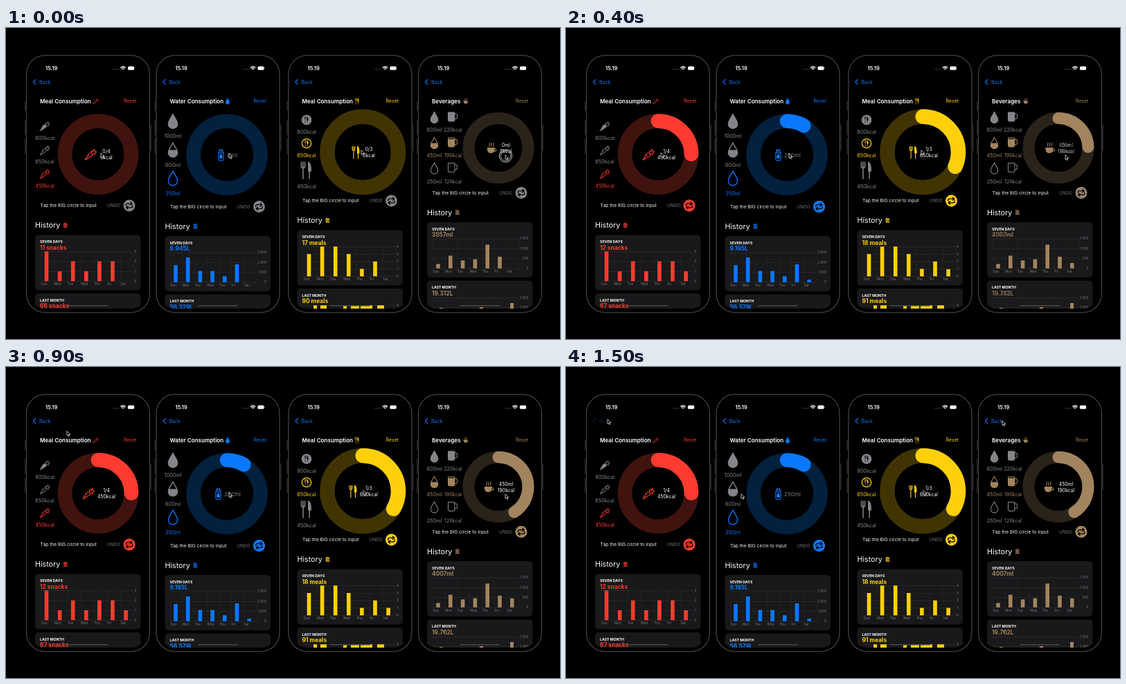
Write an HTML page with a canvas that moves like this. It is 800 by 450 pixels and loops after 1.6 s.

```html
<!DOCTYPE html>
<html lang="en">
<head>
<meta charset="utf-8">
<title>Consumption trackers</title>
<style>
  html, body { margin: 0; width: 100%; height: 100%; overflow: hidden; background: #000; }
  canvas { display: block; }
</style>
</head>
<body>
<canvas id="stage" width="800" height="450"></canvas>
<script>
const ctx = document.getElementById('stage').getContext('2d');
const LOOP = 1600, STEP = 100;
const GREY = '#858589', BLUE = '#0a74f5';
const DAYS = ['Sun', 'Mon', 'Tue', 'Wed', 'Thu', 'Fri', 'Sat'];

// Icons live in a box of about 22 units: a fillable body and stroked details.
const shape = (body, detail = '') => ({ body: new Path2D(body), detail: new Path2D(detail) });
const ICONS = {
  carrot: shape('M-10 10L-3.5-1.5C-1-5.5 5.5-1 2.5 2.5Z', 'M2.5-2.5L2-7 5-6 7-10 8-6 11-5 8-3 8 0 4-1M-4.5 1L-2.5 2.5M-6 6L-4.5 7'),
  drop: shape('M0-11C2-6 7-1 7 4A7 7 0 0 1-7 4C-7-1-2-6 0-11Z'),
  cutlery: shape('M2.6-11C5-9.5 6-4 5.6 1H2.6Z', 'M-7-11V-5.5Q-7-3-4.6-3Q-2.2-3-2.2-5.5V-11M-4.6-11V11M3.8 1V11'),
  cup: shape('M-8-1H6C6 6 4 9-1 9S-8 6-8-1Z', 'M6 1C11 0 11 6 5 6M-4-4C-6-7-2-8-4-11M0-4C-2-7 2-8 0-11M4-4C2-7 6-8 4-11'),
  mug: shape('M-9-9H4V6Q4 9 1 9H-6Q-9 9-9 6Z', 'M4-6H6Q9-6 9-3V1Q9 4 6 4H4'),
  bottle: shape('M0-2C1 0 2.6 2 2.6 4A2.6 2.6 0 0 1-2.6 4C-2.6 2-1 0 0-2Z', 'M-3-10.5H3V-8H-3ZM-3-8C-3-6-5-6-5-3V8Q-5 10.5-3 10.5H3Q5 10.5 5 8V-3C5-6 3-6 3-8M-5-4H5')
};

const PHONES = [
  { x: 29, title: 'Meal Consumption', small: 'carrot', smallX: 129.5, color: '#ff3b30', track: '#41130f',
    ring: [133, 182.6, 48, 20.8], turn: 90, start: 0, span: 300, row: 257,
    icon: 'carrot', iconX: 122, iconSize: .78, shift: -3, textX: 145, before: ['0/4', '0kcal'], after: ['1/4', '450kcal'],
    sideX: 27, side: [['carrot', 142, '800kcal', 159], ['carrot', 177, '650kcal', 193], ['carrot', 211, '450kcal', 228]],
    levels: [1, 0, 0], sideSize: .66, picked: 2,
    week: ['11 snacks', '12 snacks'], month: ['66 snacks', '67 snacks'],
    barX: 29.5, gap: 19.1, bars: [3, 1, 2, 1, 2, 2, 1], axis: ['3', '2', '1', '0'], max: 3,
    cursor: [[500, 137, 181], [700, 120, 145], [900, 88, 93], [1200, 61, 72], [1500, 60, 76]] },
  { x: 216.5, title: 'Water Consumption', small: 'drop', smallX: 320, color: '#0a78ff', track: '#02213f',
    ring: [319.1, 183.2, 48.4, 20.6], turn: 30, start: 75, span: 305, row: 258.5,
    icon: 'bottle', iconX: 310.5, iconSize: .74, shift: -4, textX: 327, before: ['0ml'], after: ['250ml'],
    sideX: 24.5, side: [['drop', 135, '1000ml', 156], ['drop', 176.5, '600ml', 198], ['drop', 217.5, '250ml', 239]],
    levels: [1, .5, 0], sideSize: .95, picked: 2,
    week: ['8.945L', '9.195L'], month: ['56.329L', '56.579L'],
    barX: 28.5, gap: 17.7, bars: [1.72, 2.5, 1.13, 1.13, .6, 1.8, .25], axis: ['3.000', '2.000', '1.000', '0'], max: 3,
    cursor: [[1200, 322, 182], [1500, 253, 184]] },
  { x: 407.5, title: 'Meal Consumption', small: 'cutlery', smallX: 507, color: '#ffd00a', track: '#403403',
    ring: [515.2, 179.5, 51.3, 21.4], turn: 120, start: 118, span: 325, row: 250,
    icon: 'cutlery', iconX: 505.5, iconSize: .78, shift: -4, textX: 524, before: ['0/3', '0kcal'], after: ['1/3', '650kcal'],
    sideX: 26.5, side: [['plate', 133, '800kcal', 150], ['plate', 167, '650kcal', 184], ['cutlery', 206, '450kcal', 229]],
    levels: [1, 0, 1], sideSize: 1.08, picked: 1,
    week: ['17 meals', '18 meals'], month: ['90 meals', '91 meals'],
    barX: 30, gap: 19.1, bars: [3, 4, 4, 3, 1, 2, 1], axis: ['4', '3', '2', '1', '0'], max: 4,
    cursor: [[500, 513, 177], [900, 516, 179]] },
  { x: 595, title: 'Beverages', small: 'cup', smallX: 664, color: '#a2845e', track: '#2a231a',
    ring: [711, 173.5, 43, 17], turn: 148, start: 208, span: 340, row: 238.5,
    icon: 'cup', iconX: 701, iconSize: .72, shift: -4, textX: 722, before: ['0ml', '0kcal'], after: ['450ml', '190kcal'],
    sideX: 23.5, side: [['drop', 129.5, '600ml', 147], ['drop', 166.5, '450ml', 184], ['drop', 203, '250ml', 222]],
    mugs: ['220kcal', '190kcal', '124kcal'], levels: [1, .5, 0], sideSize: .75, picked: 1,
    week: ['3557ml', '4007ml'], month: ['19.312L', '19.762L'],
    barX: 29, gap: 17.8, bars: [.22, .64, .4, .46, 1.2, .59, .45], axis: ['1.500', '1.000', '500', '0'], max: 1.5,
    cursor: [[1000, 721, 184], [1200, 663, 115], [1500, 630, 78]] }
];

const clamp = v => Math.max(0, Math.min(1, v));
const smooth = v => { v = clamp(v); return v * v * (3 - 2 * v); };

function text(str, x, y, size, color = '#fff', weight = 400, align = 'left') {
  ctx.font = `${weight} ${size}px Inter, sans-serif`;
  ctx.textAlign = align;
  ctx.fillStyle = color;
  ctx.fillText(str, x, y + size * .36);
}

function crossfade(fade, [a, b], ...rest) {
  ctx.globalAlpha = 1 - fade;
  if (fade < 1) text(a, ...rest);
  ctx.globalAlpha = fade;
  if (fade > 0) text(b, ...rest);
  ctx.globalAlpha = 1;
}

function box(x, y, w, h, r, fill, line) {
  ctx.beginPath();
  ctx.roundRect(x, y, w, h, r);
  if (fill) { ctx.fillStyle = fill; ctx.fill(); }
  if (line) { ctx.strokeStyle = line; ctx.stroke(); }
}

function rect(x, y, w, h, color) {
  ctx.fillStyle = color;
  ctx.fillRect(x, y, w, h);
}

function disc(x, y, r, fill, line) {
  box(x - r, y - r, 2 * r, 2 * r, r, fill, line);
}

function stroke(d, x, y, size, color, width) {
  ctx.save();
  ctx.translate(x, y);
  ctx.scale(size, size);
  ctx.strokeStyle = color;
  ctx.lineWidth = width;
  ctx.stroke(new Path2D(d));
  ctx.restore();
}

function icon(name, x, y, size, color, level = 0) {
  if (name === 'plate') {
    ctx.lineWidth = 1.2;
    disc(x, y, 6.7, level ? color : null, color);
    return icon('cutlery', x, y, .4, level ? '#000' : color, 1);
  }
  const { body, detail } = ICONS[name];
  ctx.save();
  ctx.translate(x, y);
  ctx.scale(size, size);
  ctx.strokeStyle = color;
  ctx.lineWidth = 1.4;
  ctx.stroke(body);
  ctx.stroke(detail);
  ctx.clip(body);
  rect(-12, 11 - 22 * level, 24, 24, color);
  ctx.restore();
}

function statusBar(x) {
  text('15.19', x + 28, 58.3, 7.5, '#fff', 600);
  for (let i = 0; i < 4; i++) rect(x + 125 + i * 2.4, 59.3, 1.4, 1, '#555');
  ctx.strokeStyle = '#fff';
  ctx.lineWidth = 1.1;
  for (const r of [1, 3, 5]) {
    ctx.beginPath();
    ctx.arc(x + 140, 60.6, r, -Math.PI * .75, -Math.PI * .25);
    ctx.stroke();
  }
  box(x + 147, 55.6, 9, 5.2, 1.6, '#fff');
  rect(x + 156.5, 57.3, .8, 1.8, '#777');
}

function shell(x) {
  for (const [y, h] of [[106, 14], [133, 22], [160, 22]]) rect(x - 2, y, 1.5, h, '#2b2b2d');
  rect(x + 179.5, 140, 1.5, 38, '#2b2b2d');
  ctx.lineWidth = 1.3;
  box(x + .5, 39.7, 178, 372, 27, '#000', '#404042');
}

function ring({ ring: [x, y, r, width], color, track, turn }, progress) {
  const arc = (angle, style) => {
    ctx.beginPath();
    ctx.arc(x, y, r, -Math.PI / 2, angle * Math.PI / 180 - Math.PI / 2);
    ctx.strokeStyle = style;
    ctx.stroke();
  };
  ctx.lineWidth = width;
  arc(360, track);
  if (progress > 0) arc(turn * progress, color);
}

function choices(p) {
  p.side.forEach(([name, y, label, labelY], i) => {
    const color = i === p.picked ? p.color : GREY, x = p.x + p.sideX;
    icon(name, x, y, p.sideSize, color, p.levels[i]);
    text(label, x, labelY, 7.3, color, 400, 'center');
    if (p.mugs) {
      icon('mug', x + 26.5, y - 1, .72, color, [1, .8, 0][i]);
      text(p.mugs[i], x + 27, labelY, 7, color, 400, 'center');
    }
  });
}

function weekChart(p, top, progress) {
  const height = 43, base = top + height, left = p.x + p.barX - 8, right = left + p.gap * 7;
  for (let i = 0; i <= 7; i++) rect(left + i * p.gap, top, .5, height + 5, '#29292b');
  p.axis.forEach((label, i) => {
    const y = top + height * i / (p.axis.length - 1);
    rect(left, y, right - left, .6, '#303033');
    text(label, p.x + 159.5, y, 4.7, '#7d7d82', 400, 'right');
  });
  p.bars.forEach((value, i) => {
    const h = height * value / p.max * (i === 6 ? progress : 1);
    rect(p.x + p.barX + i * p.gap - 2.8, base - h, 5.6, h, p.color);
    text(DAYS[i], left + i * p.gap + .5, base + 4.3, 4.6, '#7d7d82');
  });
}

function monthChart(p, i) {
  if (i === 2) {
    rect(428, 401, 134, .6, '#303033');
    text('4', 567, 401, 4.7, '#7d7d82', 400, 'right');
    for (const [x, w] of [[444, 5], [454, 9], [487, 5], [498, 12], [512, 17], [536, 10]]) rect(x, 401.3, w, 6, p.color);
  }
  if (i === 3) {
    for (let x = 616; x < 742; x += 4.2) rect(x, 390, .5, 18, '#29292b');
    ['1.500', '1.000'].forEach((label, k) => {
      rect(616, 390 + k * 14, 125, .6, '#303033');
      text(label, 754.5, 390 + k * 14, 4.7, '#7d7d82', 400, 'right');
    });
    for (const [x, y] of [[626, 405], [684, 404], [728, 398]]) rect(x, y, 5, 9, p.color);
  }
}

function card(p, y, heading, value, fade) {
  box(p.x + 13, y, 152.5, 80, 5, '#19191b');
  text(heading, p.x + 20, y + 9.7, 5.2, '#fff', 700);
  crossfade(fade, value, p.x + 20, y + 18, 8.4, p.color, 700);
}

function pointer(points, t) {
  let [, x, y] = points[0];
  for (let i = 1; i < points.length; i++) {
    const [t0, x0, y0] = points[i - 1], [t1, x1, y1] = points[i];
    if (t <= t0) break;
    const k = clamp((t - t0) / (t1 - t0));
    x = x0 + (x1 - x0) * k;
    y = y0 + (y1 - y0) * k;
  }
  ctx.save();
  ctx.translate(x, y);
  const arrow = new Path2D('M0 0V6.2L1.5 4.9 2.6 7.4 3.7 6.9 2.6 4.5H4.5Z');
  ctx.lineWidth = .8;
  ctx.strokeStyle = '#ddd';
  ctx.fillStyle = '#000';
  ctx.fill(arrow);
  ctx.stroke(arrow);
  ctx.restore();
}

function phone(p, i, t) {
  const progress = smooth((t - p.start) / p.span);
  const fade = clamp((progress - .1) / .85);
  const { x, color, row } = p;

  shell(x);
  ctx.save();
  ctx.beginPath();
  ctx.roundRect(x + 6, 45, 167, 361, 21);
  ctx.clip();

  statusBar(x);
  ctx.globalAlpha = i === 0 && t >= 1400 ? .25 : 1;
  stroke('M0-3.7L-3.6 0 0 3.7', x + 14, 78, 1, BLUE, 1.1);
  text('Back', x + 19, 78, 7, BLUE);
  ctx.globalAlpha = 1;
  text(p.title, x + 20, 106, 8.1, '#fff', 600);
  icon(p.small, p.smallX, 106, .38, color, p.small === 'carrot' ? 0 : 1);
  text('Reset', x + 141, 106, 6.9, color);

  ring(p, progress);
  choices(p);

  const cy = p.ring[1] + .6;
  icon(p.icon, p.iconX + p.shift * progress, cy, p.iconSize, color, p.icon === 'carrot' ? 0 : 1);
  p.before.forEach((old, k) => {
    const single = p.before.length === 1;
    crossfade(fade, [old, p.after[k]], p.textX, single ? cy + .5 : cy - 5 + k * 9.2,
      single ? 8.2 : 6.9, single ? '#77777b' : '#fff', 400, 'center');
  });

  text('Tap the BIG circle to input', x + 20.6, row, 6.7, '#f2f2f2');
  text('UNDO', x + 117, row, 6.35, '#737377');
  disc(x + 149, row, 8.4, GREY);
  ctx.globalAlpha = fade;
  disc(x + 149, row, 8.4, color);
  ctx.globalAlpha = 1;
  const loopArrow = 'M-5 0V-1Q-5-3-3-3H4M2-5.2L4.6-3 2-.8';
  stroke(loopArrow, x + 149, row, .95, '#000', 1.4);
  stroke(loopArrow, x + 149, row, -.95, '#000', 1.4);

  text('History', x + 13, row + 28.3, 10.7, '#fff', 400);
  [5, 6, 5, 6].forEach((w, k) => rect(x + 54, row + 25 + k * 1.8, w, 1.2, color));

  const top = row + 42.5;
  card(p, top, 'SEVEN DAYS', p.week, fade);
  weekChart(p, top + 23.8, progress);
  card(p, top + 84.5, 'LAST MONTH', p.month, fade);
  monthChart(p, i);
  box(x + 60.5, 401, 58, 1.6, .8, '#48484b');
  ctx.restore();

  if (i === 3 && t < STEP) {
    ctx.lineWidth = .9;
    disc(721.5, 185, 9.2, null, '#ddd');
    disc(721.5, 185, 7.2, null, '#bbb');
  }
  pointer(p.cursor, t);
}

function draw(now) {
  const t = Math.floor(now % LOOP / STEP) * STEP;
  rect(0, 0, 800, 450, '#000');
  ctx.lineCap = ctx.lineJoin = 'round';
  PHONES.forEach((p, i) => phone(p, i, t));
  requestAnimationFrame(draw);
}
requestAnimationFrame(draw);
</script>
</body>
</html>
```
